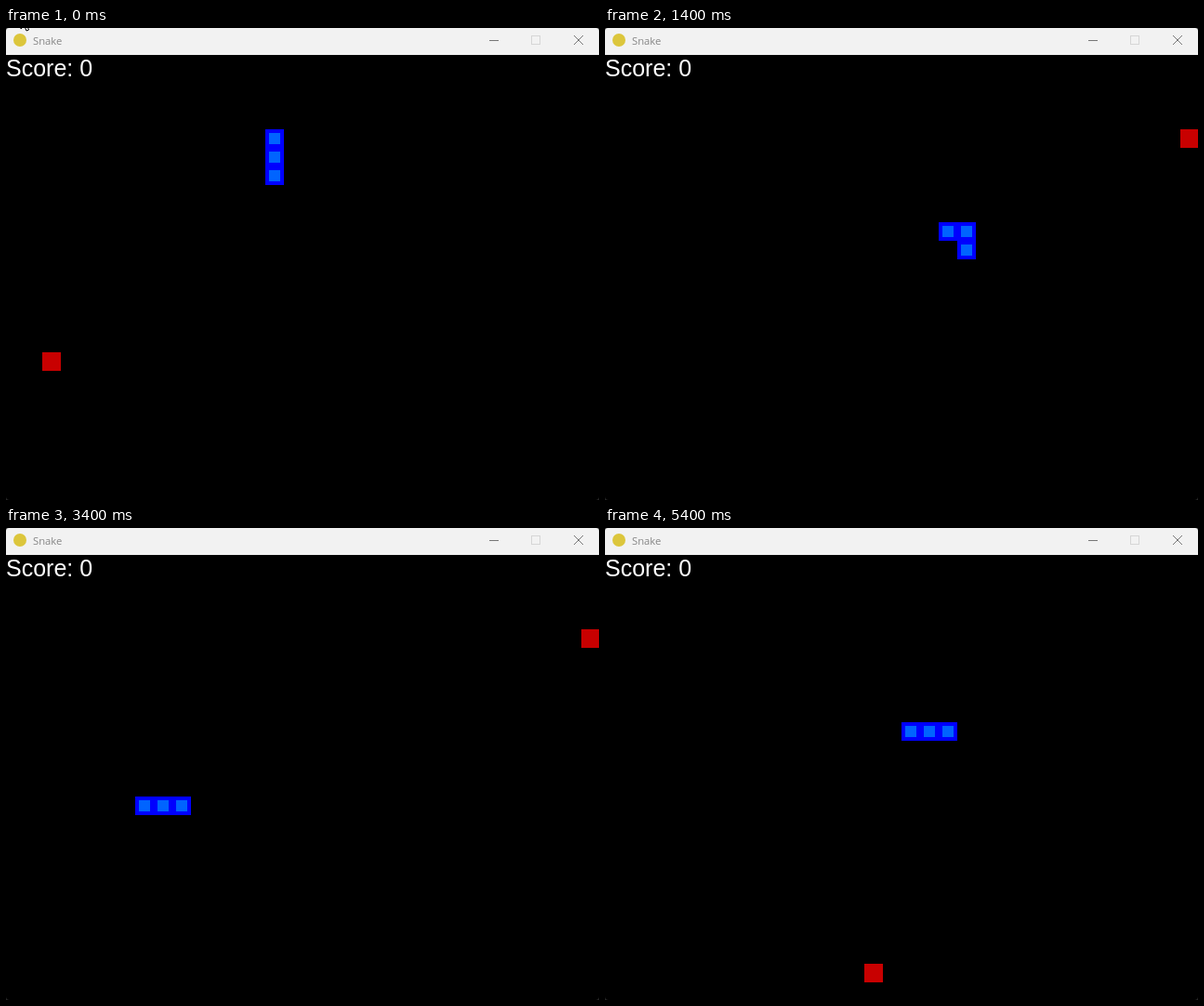
An HTML page with a canvas that plays this animation: 638 by 508 pixels, repeating every 5.5 s.

```html
<!DOCTYPE html>
<html lang="en">
<head>
<meta charset="utf-8">
<title>Snake</title>
<style>
  html, body { margin: 0; width: 100%; height: 100%; overflow: hidden; background: #000; }
  canvas { display: block; }
</style>
</head>
<body>
<canvas id="stage" width="638" height="508"></canvas>
<script>
const ctx = document.getElementById('stage').getContext('2d');
const TICK = 100, LOOP = 5500, CELL = 20, LEFT = -1, TOP = 29;
const MOVES_PER_TICK = 2.19, FIRST_HEAD = 2.4;
const STALLS = [13, 18, 22, 27, 33, 39, 51]; // ticks that repeat the previous picture
const STEP = { U: [0, -1], D: [0, 1], L: [-1, 0], R: [1, 0] };

// Each game: starting tick, food cell, tail cell and the route walked from it.
const games = [
  { begin: 0, food: [2, 16], tail: [14, 6], route: 'U6' },
  { begin: 2, food: [15, 1], tail: [14, 12], route: 'R4 U9 R U3' },
  { begin: 10, food: [31, 4], tail: [14, 12],
    route: 'R3 D R2 U4 L3 D2 R2 U2 L2 D R2 U L2 U L D3 L U L2 D L D3 L4 U3 ' +
           'R2 D2 L2 D R D L2 U4 R6 U R2 U3 L2 U3 L12' },
  { begin: 51.8, food: [14, 22], tail: [14, 12], route: 'R2 U3 R2' }
];

function trace({ tail, route }) {
  const cells = [tail];
  for (const [dir, ...count] of route.split(' ')) {
    const [dx, dy] = STEP[dir];
    for (let i = +count.join('') || 1; i > 0; i--) {
      const [x, y] = cells[cells.length - 1];
      cells.push([x + dx, y + dy]);
    }
  }
  return cells;
}
for (const game of games) game.cells = trace(game);

function sceneAt(tick) {
  if (STALLS.includes(tick)) tick--;
  const { begin, food, cells } = games.findLast(game => game.begin <= tick);
  const moved = Math.floor(FIRST_HEAD + MOVES_PER_TICK * (tick - begin));
  const head = Math.min(moved, cells.length - 1);
  return { food, snake: cells.slice(head - 2, head + 1) };
}

function block([col, row], color, inset = 0) {
  ctx.fillStyle = color;
  ctx.fillRect(LEFT + col * CELL + inset, TOP + row * CELL + inset,
               CELL - 2 * inset, CELL - 2 * inset);
}

function panel(height, color, radii) {
  ctx.fillStyle = color;
  ctx.beginPath();
  ctx.roundRect(0, 0, 638, height, radii);
  ctx.fill();
}

function text(str, x, y, font, color) {
  ctx.font = font;
  ctx.fillStyle = color;
  ctx.fillText(str, x, y);
}

function line(color, ...segments) {
  ctx.strokeStyle = color;
  ctx.lineWidth = 1;
  ctx.beginPath();
  for (const [x1, y1, x2, y2] of segments) {
    ctx.moveTo(x1, y1);
    ctx.lineTo(x2, y2);
  }
  ctx.stroke();
}

function titleBar() {
  panel(TOP, '#f2f2f2', [3, 3, 0, 0]);
  ctx.fillStyle = '#dcc63c';
  ctx.beginPath();
  ctx.arc(15, 13, 7, 0, 2 * Math.PI);
  ctx.fill();
  text('Snake', 29, 18, '11.25px "Open Sans", sans-serif', '#868686');
  line('#777', [520, 13.5, 530, 13.5], [611, 8, 621, 18], [621, 8, 611, 18]);
  ctx.strokeStyle = '#d6d6d6';
  ctx.strokeRect(565.5, 8.5, 9, 9);
}

// The mouse pointer slides right along the top edge, slows down and leaves.
function pointer(tick) {
  if (tick > 9) return;
  const x = 16 + 9 * Math.min(tick, 6) + 2.5 * Math.max(tick - 6, 0);
  ctx.save();
  ctx.translate(x, -15.5);
  ctx.beginPath();
  for (const [px, py] of [[0, 0], [0, 16.5], [3.7, 13], [6, 18.5], [8.5, 17.5], [6.2, 12], [11, 12]])
    ctx.lineTo(px, py);
  ctx.closePath();
  ctx.fillStyle = '#fff';
  ctx.fill();
  ctx.strokeStyle = '#000';
  ctx.stroke();
  ctx.restore();
}

function draw(now) {
  const tick = Math.floor(now % LOOP / TICK);
  const { food, snake } = sceneAt(tick);
  ctx.fillStyle = '#2a2a2a';
  ctx.fillRect(0, 0, 638, 508);
  panel(508, '#000', 4);
  titleBar();
  for (const cell of snake) {
    block(cell, '#0000ff');
    block(cell, '#0064ff', 4);
  }
  block(food, '#c80000');
  text('Score: 0', 0, 52, '25px "Liberation Sans", Arial, sans-serif', '#fff');
  pointer(tick);
}

const began = performance.now();
function frame() {
  draw(performance.now() - began);
  requestAnimationFrame(frame);
}
frame();
</script>
</body>
</html>
```
